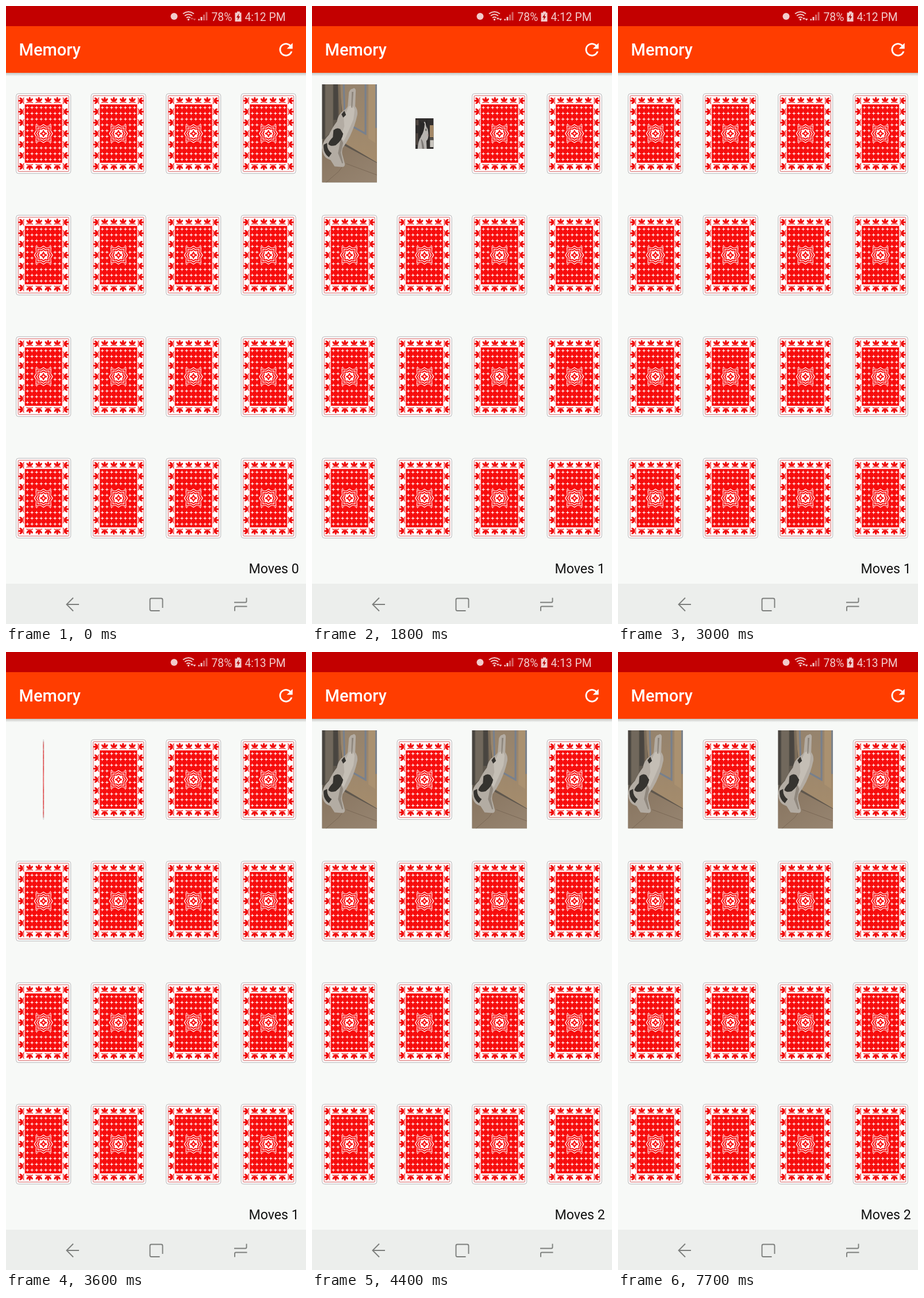
Animation of 522 by 1073 pixels, one loop 8.7 s. Source, as an HTML page:

```html
<!DOCTYPE html>
<html lang="en">
<head>
<meta charset="utf-8">
<title>Memory</title>
<style>
  html, body { margin: 0; width: 100%; height: 100%; overflow: hidden; background: #f7f9f7; }
  svg { display: block; }
  text { font-family: Roboto, sans-serif; }
</style>
</head>
<body>
<svg id="stage" width="522" height="1073" viewBox="0 0 522 1073">
  <defs>
    <linearGradient id="shade" x2="0" y2="1">
      <stop stop-color="#c2c4c3"/><stop offset="1" stop-color="#f7f9f7"/>
    </linearGradient>
    <linearGradient id="floor" x2="1" y2="1">
      <stop stop-color="#87745f"/><stop offset="1" stop-color="#978571"/>
    </linearGradient>
    <linearGradient id="door" x2="0" y2="1">
      <stop stop-color="#95836d"/><stop offset="1" stop-color="#a58c6c"/>
    </linearGradient>

    <g id="petal" fill="#f00c0c">
      <ellipse cy="-1.5" rx="1.9" ry="4.2"/>
      <ellipse cx="-3.2" cy="-.2" rx="1.7" ry="3.9" transform="rotate(-38 -3.2 -.2)"/>
      <ellipse cx="3.2" cy="-.2" rx="1.7" ry="3.9" transform="rotate(38 3.2 -.2)"/>
      <path d="M-6 5q3-2.5 4.5 0M6 5q-3-2.5-4.5 0M0 1v4" fill="none" stroke="#f00c0c" stroke-width="1.3"/>
    </g>
    <g id="back"></g>

    <!-- white cat stretching up a door -->
    <svg id="tall" x="-47.8" y="-85.5" width="95.6" height="170.5" viewBox="0 0 96 171">
      <path fill="#5f574d" d="M0 0h96v171H0z"/>
      <path fill="#494540" d="M0 0h5v95H0zM20 0h8v62h-8z"/>
      <path fill="#71685c" d="M6 0h13v80L6 92z"/>
      <path fill="url(#door)" d="M30 0h66v136L42 104z"/>
      <path fill="#7c6d5a" d="M28 0h4l5 104h-5z"/>
      <path fill="none" stroke="#78808c" stroke-width="3.2" d="M38 0l2 66 36 20V0"/>
      <path fill="#aa9170" d="M81 0h12v102l-12-8z"/>
      <path fill="#7b818a" d="M93 0h3v76h-3z"/>
      <path fill="url(#floor)" d="M0 112l34-8 62 33v34H0z"/>
      <path fill="none" stroke="#7a6856" d="M38 140l-9 12-22 19M42 138l54 20"/>
      <path fill="#b3aca3" d="M53 8q4-4 6 2l-1 28q6 8 3 18-3 15-12 34-6 12-13 21-2 8 0 13l4 15q0 5-5 5l-13-1-7-11q-17-5-14-27 3-9 11-17 7-14 14-23 2-13 11-19 6-3 8-8l2-24q3-7 6-6z"/>
      <path fill="#c4beb5" d="M47 38q8-3 10 6l-2 17-9 21-8 17-5-6 6-20-1-15z"/>
      <path fill="#8f877d" d="M52 13l-1 27 2 1 2-28zM33 94l-5 26 7 18 2-1-4-18 4-17z"/>
      <path fill="#35332f" d="M20 80q6-6 12-2l5 8q-2 12-13 20-9 3-13-2 1-5 8-12zM3 105q-2 14 9 22l5-7q-9-6-8-18zM34 52l5-6 3 7-5 5z"/>
    </svg>

    <!-- cat portrait in a dark room -->
    <svg id="wide" x="-47.8" y="-26.5" width="95.6" height="53" viewBox="0 0 96 53">
      <path fill="#302e2d" d="M0 0h96v53H0z"/>
      <path fill="#514943" d="M3 3h14v9H3zM3 26h11v20H3z"/>
      <path fill="#a48967" d="M76 12h20v21H76z"/>
      <path fill="#c8c5be" d="M77 38h19v12H77z"/>
      <path fill="#55534f" d="M76 34h20v4H76z"/>
      <path fill="#b7b4b0" d="M12 53q2-14 18-21 0-16 9-23 9-6 17 0 11 8 13 21-3 8-11 9l2 14z"/>
      <path fill="#292828" d="M23 3l11 5 8-3 7 5q-3 13-15 19-10 5-12-1 4-12 1-25zM53 7l9-7 1 18q-6-2-10-11z"/>
      <path fill="#7d7976" d="M29 36q12 1 18 17H36q-3-9-7-17z"/>
      <circle cx="56" cy="20" r="2.2" fill="#32372c"/>
      <path fill="#a68680" d="M64 27l5 1-3 4z"/>
    </svg>
  </defs>

  <path fill="#f7f9f7" d="M0 0h522v1073H0z"/>
  <path fill="url(#shade)" d="M0 116h522v6H0z"/>
  <path fill="#c30000" d="M0 0h522v35H0z"/>
  <path fill="#ff3d00" d="M0 35h522v81H0z"/>
  <path fill="#eceeec" d="M0 1003h522v70H0z"/>

  <g fill="#f2cccc">
    <circle cx="292.5" cy="18" r="6"/>
    <g fill="none" stroke="#f2cccc" stroke-width="2">
      <path d="M308 13.5q9.500-7 19 0M311 17q6.500-5 13 0M314 20.500q3.500-2.500 7 0"/>
    </g>
    <circle cx="317.5" cy="23.500" r="1.700"/>
    <path id="traffic" d="M321 23l2.500-3.500 2.500 3.500zM325.500 22h5l-2.500 3.500z"/>
    <path d="M334.500 22.500h2.500v2.500h-2.500zM338.500 19h3v6h-3z"/>
    <path fill="#d86565" d="M343 15h3v10h-3zM347.500 10.500h3v14.500h-3z"/>
    <path d="M402 9.500h5v2h2.500v15.500h-11V11.500h3.500z"/>
    <path fill="#b00000" d="M405.500 13l-4.500 7h2.700l-1 5 4.500-7h-2.700z"/>
    <text x="357.500" y="25.500" font-size="19.300">78%</text>
    <text id="clock" x="486.500" y="25.500" font-size="19.300" text-anchor="end">4:12 PM</text>
  </g>

  <text x="22.600" y="86" font-size="29" font-weight="500" fill="#fff">Memory</text>
  <path transform="translate(469.700 58.400) scale(1.450)" fill="#fff" d="M17.650 6.350C16.200 4.900 14.210 4 12 4c-4.420 0-7.990 3.580-7.990 8s3.570 8 7.990 8c3.730 0 6.840-2.550 7.730-6h-2.080c-.82 2.330-3.040 4-5.650 4-3.310 0-6-2.690-6-6s2.690-6 6-6c1.660 0 3.140.69 4.220 1.780L13 11h7V4z"/>

  <g id="cards"></g>
  <text id="moves" x="422.400" y="985" font-size="23.200" fill="#111">Moves 0</text>

  <g fill="none" stroke="#7d7f7d" stroke-width="1.900">
    <path d="M127 1039H105.500M117 1027.500L105.500 1039l11.500 11.500"/>
    <path d="M272.500 1045v-14q0-2.500-2.500-2.500h-17q-2.500 0-2.500 2.500v16.500q0 2.500 2.500 2.500h14.500"/>
    <path d="M397 1035.500h19.500q2 0 2-2v-6M419.500 1042.500h-19.500q-2 0-2 2v6"/>
  </g>
</svg>
<script>
const LOOP = 8700, STEP = 100;
const $ = id => document.getElementById(id);
const RED = '#f70d0d';

const rect = (w, h, attrs) =>
  `<rect x="${-w / 2}" y="${-h / 2}" width="${w}" height="${h}" ${attrs}/>`;
const petal = (x, y, turn) =>
  `<use href="#petal" transform="translate(${x} ${y}) rotate(${turn}) scale(.95)"/>`;

// Every second tip reaches out by the factor diag
function star(r, fill, tips = 8, inner = 0.8, diag = 1) {
  const pts = [];
  for (let i = 0; i < tips * 2; i++) {
    const a = i * Math.PI / tips;
    const d = r * (i % 2 ? inner : i % 4 ? diag : 1);
    pts.push((d * Math.sin(a)).toFixed(2) + ',' + (-d * Math.cos(a)).toFixed(2));
  }
  return `<polygon points="${pts.join(' ')}" fill="${fill}"/>`;
}

function cardBack() {
  let s = rect(95, 138.5, 'rx="4" fill="#fff" stroke="#b5b3b6"') +
    rect(88, 131.5, 'rx="1" fill="none" stroke="#d65a5a"') +
    rect(65, 101.5, `fill="${RED}"`);
  for (let x = -24; x <= 24; x += 16) s += petal(x, -58, 0) + petal(x, 58, 180);
  for (let y = -57; y <= 57; y += 19) s += petal(-38.5, y, -90) + petal(38.5, y, 90);
  for (let x = -28; x <= 28; x += 8)
    for (let y = -45; y <= 45; y += 10)
      if (Math.hypot(x, y) > 18)
        s += `<g transform="translate(${x} ${y})">${star(3.6, '#fff', 4, 0.27)}</g>`;
  [18, 16.5, 15, 12.5, 11, 8.5].forEach((r, i) =>
    s += star(r, i % 2 ? '#fff' : RED, 8, 0.86, 1.18));
  return s + star(7, RED, 4, 0.5) + star(3, '#fff', 4, 0.4);
}

$('back').innerHTML = cardBack();

const faces = ['tall', 'wide', 'tall'];
const cards = Array.from({ length: 16 }, (_, i) => {
  const g = document.createElementNS('http://www.w3.org/2000/svg', 'g');
  g.pos = `translate(${65.2 + i % 4 * 130.5} ${221.5 + (i >> 2) * 211})`;
  g.setAttribute('transform', g.pos);
  g.innerHTML = '<use href="#back"/>' + (faces[i] ? `<use href="#${faces[i]}"/>` : '');
  return $('cards').appendChild(g);
});

const ramp = (t, from, to) => Math.min(1, Math.max(0, (t - from) / (to - from)));

// 0 = face down, 1 = face up
const turns = [
  t => ramp(t, 810, 1256) - ramp(t, 2410, 3000) + ramp(t, 3310, 3890),
  t => ramp(t, 1420, 1990) - ramp(t, 2410, 3000),
  t => ramp(t, 3800, 4400)
];

function draw(now) {
  const t = Math.floor(now % LOOP / STEP) * STEP;
  turns.forEach((turn, i) => {
    const u = turn(t), [back, face] = cards[i].children;
    const width = Math.max(0.01, Math.abs(1 - 2 * u));
    cards[i].setAttribute('transform', `${cards[i].pos} scale(${width} 1)`);
    back.style.display = u > 0.5 ? 'none' : '';
    face.style.display = u > 0.5 ? '' : 'none';
  });
  $('moves').textContent = 'Moves ' + (t < 1500 ? 0 : t < 3900 ? 1 : 2);
  $('clock').textContent = t < 3600 ? '4:12 PM' : '4:13 PM';
  $('traffic').style.opacity = t < 700 ? 0.45 : 1;
}

const start = performance.now();
function tick() {
  draw(performance.now() - start);
  requestAnimationFrame(tick);
}
tick();
</script>
</body>
</html>
```
